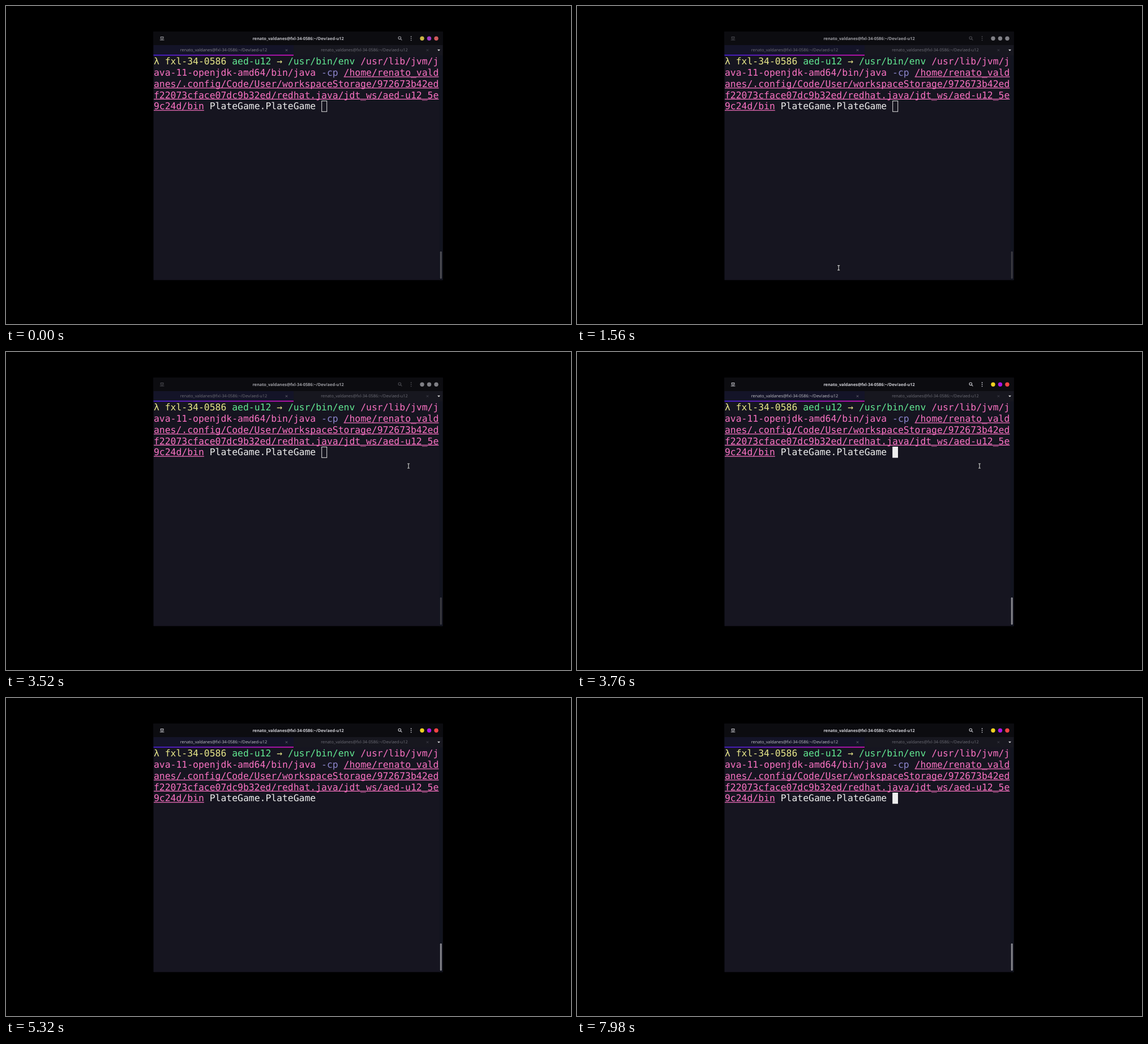
Recreate the animation shown at these times as an HTML page. Size 998x561 px, loop 8 s.

```html
<!DOCTYPE html>
<html lang="en">
<head>
<meta charset="utf-8">
<title>Terminal</title>
<style>
  html, body { margin: 0; width: 100%; height: 100%; overflow: hidden; background: #000; }
  svg { display: block; width: 100vw; height: 100vh; }
  text { white-space: pre; text-rendering: geometricPrecision; }
  .mono { font: 16.4px "DejaVu Sans Mono", monospace; }
  .ui { font: 7.35px "Open Sans", sans-serif; text-anchor: middle; }
  .bold { font-weight: 700; }
</style>
</head>
<body>
<svg viewBox="0 0 998 561">
  <defs>
    <linearGradient id="accent">
      <stop offset="0" stop-color="#4a1fe0"/>
      <stop offset="1" stop-color="#dc10c4"/>
    </linearGradient>
  </defs>

  <rect x="260.5" y="45" width="511" height="438.5" fill="#161520"/>
  <rect x="260.5" y="45" width="511" height="24" fill="#0c0c10"/>
  <rect x="260.5" y="69" width="247.5" height="18" fill="#141428"/>
  <rect x="508" y="69" width="263.5" height="18" fill="#17171f"/>
  <rect x="765.5" y="87" width="6" height="396.5" fill="#12141f"/>
  <rect x="260.5" y="85.9" width="247.5" height="1.6" fill="url(#accent)"/>

  <text id="title" class="ui bold" x="516" y="59.6"></text>
  <text id="activeTab" class="ui" x="384.5" y="80.4"></text>
  <text id="otherTab" class="ui" x="633" y="80.4" fill="#6d6d76"></text>
  <path d="M493.8 76.3l3.4 3.4m0-3.4l-3.4 3.4" stroke="#77777f" stroke-width=".8"/>
  <path d="M742.8 76.3l3.4 3.4m0-3.4l-3.4 3.4" stroke="#4a4a54" stroke-width=".8"/>
  <path d="M762 76.8h5l-2.5 2.8z" fill="#e0e0e0"/>

  <g id="icons" fill="none" stroke-width="1.1">
    <path d="M273.3 58.5v-4h4.6v4M271.8 60h7.6M275.6 56v4"/>
    <circle cx="695.3" cy="56.3" r="2.3"/>
    <path d="M697 58l2.4 2.4"/>
    <path d="M715.6 54h.01M715.6 57.2h.01M715.6 60.4h.01" stroke-width="1.8" stroke-linecap="round"/>
  </g>
  <g id="buttons"></g>

  <g id="screen"></g>
  <rect id="block"/>
  <rect id="scrollbar" x="766.7" y="433" width="3" height="48" rx="1.2"/>

  <g id="pointer" fill="none" stroke-linecap="round">
    <path d="M-1.7-4H1.7M0-4V4M-1.7 4H1.7" stroke="#08080c" stroke-width="2.6"/>
    <path d="M-1.7-4H1.7M0-4V4M-1.7 4H1.7" stroke="#d4d4d8" stroke-width="1.2"/>
  </g>
</svg>

<script>
const LOOP = 8000;
const LEFT = 261, COL = 9.87, BASE = 103.4, ROW = 19.7;
const YELLOW = '#e9e88a', GREEN = '#62e892', PINK = '#fa72c2',
      VIOLET = '#8c85cc', WHITE = '#eeeeee';
const $ = id => document.getElementById(id);

function add(parent, tag, attrs, content = '') {
  const node = document.createElementNS('http://www.w3.org/2000/svg', tag);
  for (const key in attrs) node.setAttribute(key, attrs[key]);
  node.textContent = content;
  return parent.appendChild(node);
}

const heading = 'renato_valdanes@fxl-34-0586:~/Dev/aed-u12';
for (const id of ['title', 'activeTab', 'otherTab']) $(id).textContent = heading;

// Each run: text, colour, underlined
const rows = [
  [['λ fxl-34-0586 ', YELLOW], ['aed-u12 ', GREEN], ['→ ', YELLOW],
   ['/usr/bin/env ', GREEN], ['/usr/lib/jvm/j', PINK]],
  [['ava-11-openjdk-amd64/bin/java ', PINK], ['-cp ', VIOLET], ['/home/renato_vald', PINK, true]],
  [['anes/.config/Code/User/workspaceStorage/972673b42ed', PINK, true]],
  [['f22073cface07dc9b32ed/redhat.java/jdt_ws/aed-u12_5e', PINK, true]],
  [['9c24d/bin', PINK, true], [' PlateGame.PlateGame ', WHITE]]
];
rows.forEach((runs, row) => {
  let col = 0;
  const y = BASE + row * ROW;
  for (const [text, fill, underlined] of runs) {
    const x = LEFT + col * COL;
    add($('screen'), 'text', { class: 'mono', x, y, fill }, text);
    if (underlined)
      add($('screen'), 'rect', { x, y: y + 1.3, width: text.length * COL, height: 1.2, fill });
    col += text.length;
  }
});

const buttonColors = [[242, 210, 32], [174, 20, 228], [250, 68, 68]];
const buttons = buttonColors.map((_, i) =>
  add($('buttons'), 'circle', { cx: 735 + i * 12.5, cy: 57.2, r: 3.7 }));

const clamp = v => Math.max(0, Math.min(1, v));
const mix = (from, to, k) => `rgb(${from.map((v, i) => v + (to[i] - v) * k)})`;
const gray = (from, to, k) => mix([from, from, from + 6], [to, to, to + 6], k);

// Pointer keys: time, x, y
const path = [
  [380, 263, 470], [820, 293, 462], [1100, 293, 462], [1560, 462, 462],
  [1840, 509, 401], [1940, 509, 401], [2300, 556, 332], [2640, 614, 260],
  [2680, 634, 245], [2780, 635, 245], [3200, 686, 213], [3500, 711, 201], [4460, 711, 201]
];

function pointerAt(t) {
  const i = path.findIndex(key => key[0] > t);
  if (i < 1) return null;
  const [t0, x0, y0] = path[i - 1], [t1, x1, y1] = path[i];
  const k = (t - t0) / (t1 - t0);
  return [x0 + (x1 - x0) * k, y0 + (y1 - y0) * k];
}

function setAttrs(node, attrs) {
  for (const key in attrs) node.setAttribute(key, attrs[key]);
}

function render(t) {
  const focus = t < 1000 ? 1 - clamp((t + 70) / 200) : clamp((t - 3540) / 200);
  const quick = focus ** 3;

  $('title').setAttribute('fill', gray(158, 208, focus));
  $('icons').setAttribute('stroke', gray(72, 196, focus));
  $('activeTab').setAttribute('fill', gray(112, 196, quick));
  $('scrollbar').setAttribute('fill', gray(58, 134, quick));
  buttons.forEach((b, i) => b.setAttribute('fill', mix([128, 128, 134], buttonColors[i], focus)));

  const solid = quick > 0.5;
  const hidden = t >= 5300 && t < 6980;
  setAttrs($('block'), {
    x: solid ? 557.2 : 557.7, y: solid ? 167 : 167.5,
    width: solid ? 9.8 : 9, height: solid ? 19.6 : 18.8,
    fill: solid ? WHITE : 'none', stroke: solid ? 'none' : '#e0e0e0',
    visibility: hidden ? 'hidden' : 'visible'
  });

  const spot = pointerAt(t);
  $('pointer').setAttribute('visibility', spot ? 'visible' : 'hidden');
  if (spot) $('pointer').setAttribute('transform', `translate(${spot})`);
}

function tick() {
  render(performance.now() % LOOP);
  requestAnimationFrame(tick);
}
tick();
</script>
</body>
</html>
```
